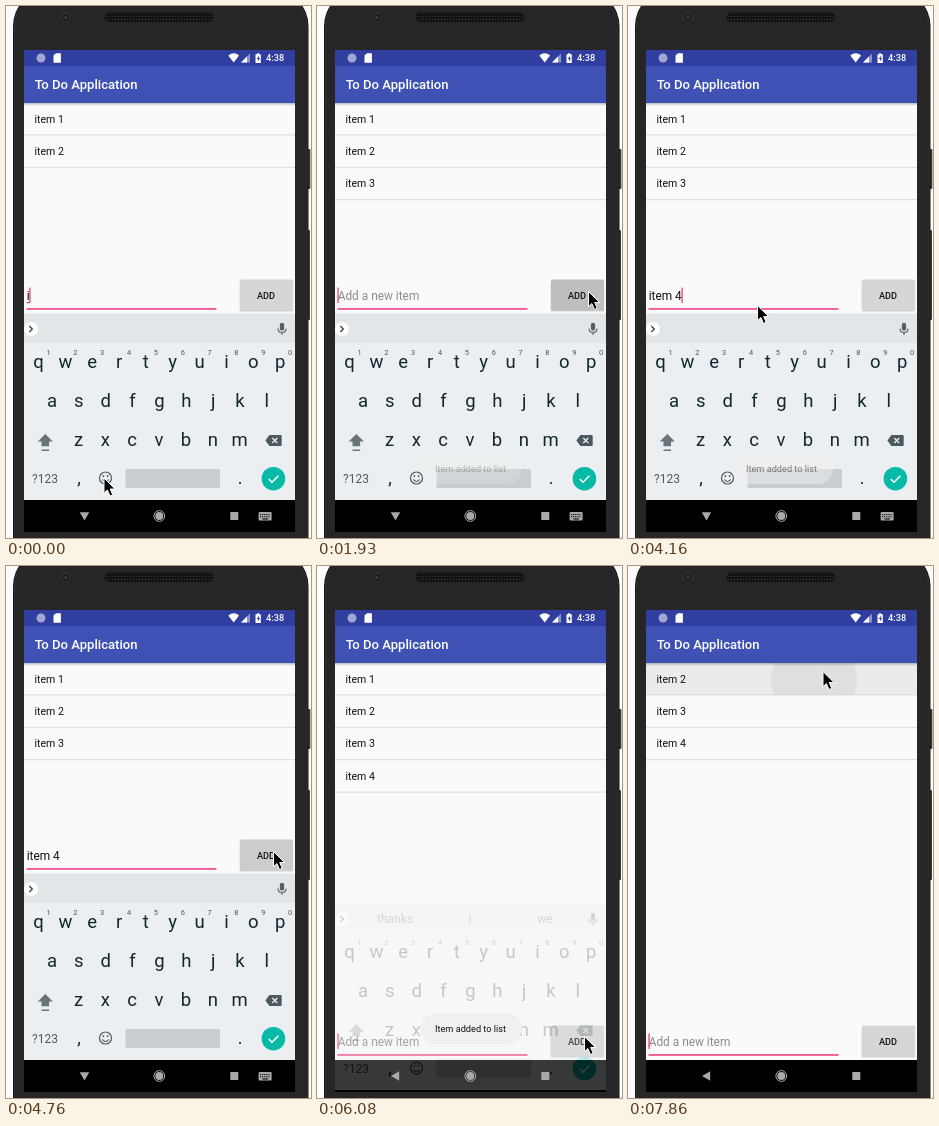
These frames come from a looping animation (305 px wide and 532 px high, 8 s). An HTML page:

```html
<!DOCTYPE html>
<html lang="en">
<head>
<meta charset="utf-8">
<title>To Do Application</title>
<style>
html, body { margin: 0; width: 100%; height: 100%; overflow: hidden; background: #fdfdfd; }
svg { display: block; width: 100%; height: 100%; }
text { font-family: Roboto, "Noto Sans", sans-serif; white-space: pre; }
.mid { text-anchor: middle; }
.med { font-weight: 500; }
</style>
</head>
<body>
<svg viewBox="0 0 305 532" xmlns="http://www.w3.org/2000/svg">
  <defs>
    <clipPath id="rowClip"><rect x="18" y="97" width="271" height="32"/></clipPath>
    <clipPath id="screenClip"><rect x="18" y="44" width="271" height="482"/></clipPath>
    <linearGradient id="shade" x1="0" y1="0" x2="0" y2="1">
      <stop offset="0" stop-color="#000" stop-opacity=".25"/>
      <stop offset="1" stop-color="#000" stop-opacity="0"/>
    </linearGradient>
    <pattern id="mesh" width="3" height="3" patternUnits="userSpaceOnUse">
      <rect width="3" height="3" fill="#111"/><circle cx="1.5" cy="1.5" r=".8" fill="#333"/>
    </pattern>
  </defs>

  <!-- phone body -->
  <rect x="300" y="143" width="4.4" height="40" rx="1" fill="#3a3a3a"/>
  <rect x="300" y="224" width="4" height="90" rx="1" fill="#3a3a3a"/>
  <rect x="7" y="-16" width="295.5" height="620" rx="36" fill="#151515"/>
  <rect x="8.5" y="-14.5" width="292.5" height="616" rx="34.5" fill="#262626" stroke="#303030"/>
  <circle cx="60" cy="11.5" r="4.2" fill="#1b1b1b" stroke="#383838"/>
  <circle cx="60" cy="11.5" r="1.8" fill="#343b42"/>
  <rect x="99" y="7" width="108" height="8.5" rx="4.2" fill="url(#mesh)" stroke="#111"/>

  <g clip-path="url(#screenClip)">
    <rect x="18" y="44" width="271" height="482" fill="#fafafa"/>
    <g id="press" clip-path="url(#rowClip)">
      <rect x="18" y="97" width="271" height="32" fill="#ebebeb"/>
      <circle id="ripple" cx="186" cy="113" fill="#dfdfdf"/>
    </g>
    <g id="list"></g>
    <rect x="18" y="97" width="271" height="3" fill="url(#shade)"/>
    <rect x="18" y="44" width="271" height="16" fill="#303f9f"/>
    <rect x="18" y="60" width="271" height="37" fill="#3f51b5"/>
    <text class="med" x="28.7" y="83" font-size="13.1" fill="#fff">To Do Application</text>

    <!-- status icons -->
    <circle cx="35" cy="52" r="4.5" fill="#9da6d4"/>
    <path d="M47.5 49.5l2.4-2.3h5v9.6h-7.4z" fill="#fff"/>
    <path d="M222.3 49.4q5.4-4.4 10.8 0l-5.4 7z" fill="#fff"/>
    <path d="M235 56.5l9-9v9z" fill="#8b95cc"/>
    <path d="M235 56.5l6-6v6z" fill="#fff"/>
    <path d="M249.5 48.2h1.6v-1h2v1h1.7v8.8h-5.3z" fill="#fff"/>
    <path d="M252.8 49.4l-2 3.6h1.2v2.6l2-3.6h-1.2z" fill="#303f9f"/>
    <text class="med" x="260" y="55" font-size="9.2" fill="#fff">4:38</text>

    <!-- entry row -->
    <g id="entry">
      <text id="hint" x="20.7" y="294" font-size="11.86" fill="#8c8c8c">Add a new item</text>
      <text id="typed" x="20.7" y="294" font-size="11.86" fill="#111"></text>
      <rect id="compose" x="20.7" y="296.3" height=".9" fill="#333"/>
      <rect id="caret" y="281.5" width="1.3" height="15.5" fill="#e8407c"/>
      <rect x="20.5" y="302.2" width="190" height="1.5" fill="#f0357c"/>
      <rect x="233.6" y="274.4" width="53.6" height="31" rx="1.5" fill="#000" opacity=".16"/>
      <rect id="add" x="234" y="273.6" width="53" height="30.8" rx="1.3"/>
      <text class="mid med" x="260" y="292.6" font-size="9.2" fill="#111">ADD</text>
    </g>

    <rect x="18" y="494" width="271" height="32" fill="#000"/>
    <g id="board">
      <rect x="18" y="307.5" width="271" height="30" fill="#e2e6e9"/>
      <rect x="18" y="337" width="271" height="157" fill="#eceff1"/>
      <circle cx="25" cy="323" r="7" fill="#fff"/>
      <path d="M23.3 320l3 3-3 3" fill="none" stroke="#37474f" stroke-width="1.3"/>
      <g fill="none" stroke="#546068" stroke-width="1.1">
        <rect x="274.4" y="317.4" width="3.2" height="6.8" rx="1.6" fill="#546068"/>
        <path d="M272 322.5q0 4 4 4t4-4M276 326.5v2.6"/>
      </g>
      <g id="bar" font-size="12" fill="#5d6b73">
        <path d="M113.5 316v14M192.5 316v14" stroke="#cbd1d4"/>
      </g>
      <g id="keys" fill="#10272f"></g>
      <path d="M39.3 428l7.6 7.6h-3.8v4.6h-7.6v-4.6h-3.8zM35.5 443.6h7.6v1.4h-7.6z" fill="#67747b"/>
      <path d="M259.4 434.5l4-5.4h11.4q.9 0 .9.9v9q0 .9-.9.9h-11.4z" fill="#4b5a62"/>
      <path d="M266.3 432l5 5m0-5l-5 5" stroke="#eceff1" stroke-width="1.3"/>
      <g fill="none" stroke="#4b5a62" stroke-width="1.2">
        <circle cx="99.5" cy="472" r="6"/>
        <path d="M96.3 473.5q3.2 4 6.4 0"/>
        <path d="M97.4 469.3v1.6M101.6 469.3v1.6" stroke-width="1.5"/>
      </g>
      <rect x="119.5" y="463" width="94.5" height="19" rx="1.5" fill="#c8cdd0"/>
      <circle cx="267.4" cy="472.7" r="11.8" fill="#06baa6"/>
      <path d="M262.8 473l3.2 3.2 6.4-6.5" fill="none" stroke="#fff" stroke-width="1.5"/>
    </g>

    <!-- navigation -->
    <g fill="#a9a9a9">
      <path id="back" d="M73.8 506.3h9.4l-4.7 8.2z"/>
      <circle cx="153.3" cy="510" r="4"/>
      <circle cx="153.3" cy="510" r="5.4" fill="none" stroke="#a9a9a9"/>
      <rect x="224.3" y="506" width="8" height="8"/>
      <g id="switcher">
        <rect x="252.6" y="506" width="13" height="8.4" rx="1"/>
        <path d="M254 508.6h10.5M254 510.8h10.5" stroke="#000" stroke-dasharray="1.2 .9"/>
        <path d="M256.5 513h5.4" stroke="#000"/>
      </g>
    </g>

    <g id="toast">
      <rect x="103.5" y="447" width="101.5" height="31" rx="15.5" fill="#eff0f0"/>
      <text class="mid" x="153.5" y="466" font-size="9.2" fill="#111">Item added to list</text>
    </g>
  </g>
  <path id="mouse" d="M0 0V15.2L3.4 12L6 18L8.7 16.8L6.2 11H11z" fill="#000" stroke="#fff" stroke-width="1" stroke-linejoin="round"/>
</svg>
<script>
const $ = id => document.getElementById(id);
const LOOP = 8000, ADDED = [1810, 4800], HIDE = 5950, REMOVED = 7200, PRESS = 7800;
const clamp = v => Math.max(0, Math.min(1, v));
const ramp = (t, from, length) => clamp((t - from) / length);
const show = (el, on) => el.setAttribute("visibility", on ? "inherit" : "hidden");

function make(parent, tag, attrs, content = "") {
  const el = document.createElementNS("http://www.w3.org/2000/svg", tag);
  for (const k in attrs) el.setAttribute(k, attrs[k]);
  el.textContent = content;
  return parent.appendChild(el);
}

const label = (parent, x, y, size, str, fill) =>
  make(parent, "text", { class: "mid", x, y, "font-size": size, ...(fill && { fill }) }, str);

// Keyboard rows: letters, first centre, baseline
[["qwertyuiop", 32.5, 362], ["asdfghjkl", 46, 401], ["zxcvbnm", 72.5, 440]].forEach(([row, x, y], r) => {
  [...row].forEach((c, i) => {
    label($("keys"), x + i * 26.85, y, 18.5, c);
    if (!r) label($("keys"), x + 10 + i * 26.85, 349, 7.4, (i + 1) % 10, "#46545c");
  });
});
label($("keys"), 39, 476.5, 12, "?123", "#4b5a62");
label($("keys"), 73, 478, 18, ",");
label($("keys"), 234, 478, 18, ".");

const words = [78, 152.8, 228].map(x => label($("bar"), x, 327, 12, ""));
const rows = [0, 1, 2, 3].map(i => {
  const g = make($("list"), "g", {}), y = i * 32.4;
  make(g, "rect", { x: 18, y: 128.4 + y, width: 271, height: 1, fill: "#d9d9d9" });
  return { g, text: make(g, "text", { x: 28.5, y: 116.6 + y, "font-size": 10.55, fill: "#111" }) };
});

const edits = [
  [0, "i"], [130, "ite"], [280, "item"], [730, "item "], [880, "item 3"], [ADDED[0], ""],
  [2950, "i"], [3100, "ite"], [3250, "item"], [3850, "item "], [4000, "item 4"], [ADDED[1], ""]
];

// Pointer stops: time, x, y
const path = [
  [0, 98, 472], [1150, 98, 472], [1640, 271.5, 285.5], [2080, 271.5, 285.5], [2230, 216, 291],
  [2500, 129.5, 299.5], [4250, 129.5, 299.5], [4650, 267.5, 285.5], [5000, 267.5, 285.5],
  [5330, 267.5, 503], [5700, 267.5, 503], [6070, 267.5, 470.5], [6130, 267, 470],
  [6850, 195, 105.5], [LOOP, 195, 105.5]
];

function pointer(t) {
  const i = path.findIndex(p => p[0] > t);
  const [t0, x0, y0] = path[i - 1], [t1, x1, y1] = path[i];
  let p = (t - t0) / (t1 - t0);
  p = p * p * (3 - 2 * p);
  return [x0 + (x1 - x0) * p, y0 + (y1 - y0) * p];
}

function guesses(str, age) {
  if (str === "item") return ["items", "item", "itemized"];
  return str === "" && age > 270 ? ["thanks", "I", "we"] : null;
}

function draw(t) {
  const [since, str] = edits.filter(e => e[0] <= t).pop();
  const age = t - since, hidden = t >= HIDE;

  const count = 2 + ADDED.filter(a => t >= a).length, gone = t >= REMOVED ? 1 : 0;
  rows.forEach(({ g, text }, i) => {
    show(g, i < count - gone);
    text.textContent = "item " + (i + 1 + gone);
  });

  $("entry").setAttribute("transform", `translate(0 ${hidden ? 186 : 0})`);
  $("typed").textContent = str;
  show($("hint"), !str);
  const width = str ? $("typed").getComputedTextLength() : 0;
  $("caret").setAttribute("x", 20.4 + width);
  show($("caret"), age % 1000 < 500);
  $("compose").setAttribute("width", width);
  show($("compose"), /^[a-z]+$/.test(str));

  const push = Math.max(...ADDED.map(a => ramp(t, a - 80, 100) * (1 - ramp(t, a + 200, 130))));
  const grey = Math.round(214 - 24 * push);
  $("add").setAttribute("fill", `rgb(${grey},${grey},${grey})`);

  const list = guesses(str, age);
  show($("bar"), list);
  if (list) words.forEach((w, i) => w.textContent = list[i]);

  const out = ramp(t, HIDE, 170);
  $("board").setAttribute("transform", `translate(0 ${out * 39})`);
  $("board").setAttribute("opacity", 1 - out);
  $("back").setAttribute("transform", hidden ? "rotate(90 78.5 510)" : "");
  show($("switcher"), !hidden);

  const toast = Math.max(...ADDED.map(a => ramp(t, a, 500) * (1 - ramp(t, a + 2100, 500))));
  $("toast").setAttribute("opacity", toast);

  show($("press"), t >= PRESS);
  $("ripple").setAttribute("r", 25 + 18 * ramp(t, PRESS, 60));
  $("mouse").setAttribute("transform", `translate(${pointer(t)})`);
}

function tick(now) {
  draw(now % LOOP);
  requestAnimationFrame(tick);
}
draw(0);
requestAnimationFrame(tick);
</script>
</body>
</html>
```
